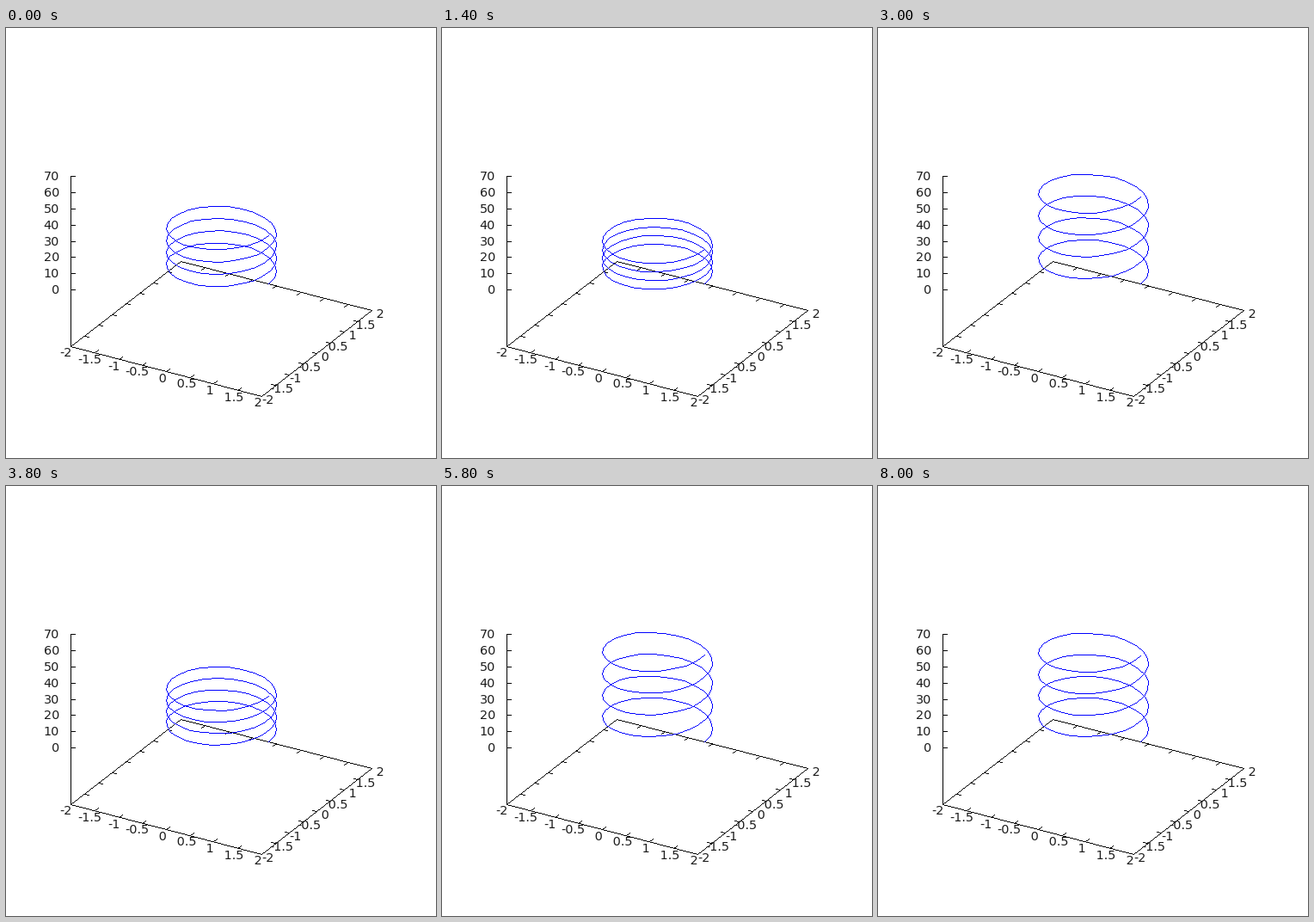
Write a matplotlib script that moves like this. It is 500 px wide and 500 px high and loops after 8200 ms.

```python
import numpy as np
import matplotlib.pyplot as plt
from matplotlib.animation import FuncAnimation

SIZE, DPI = 500, 100
FRAMES, INTERVAL = 41, 200
BLACK, BLUE = (0, 0, 0), (0, 0, 255)

CX, CY = 250.0, 349.2      # centre of the base plane
RX, RY = 64.0, 28.75       # screen radii of a unit circle
Z_UNIT, Z_BASE = 1.888, -35
VIEW = np.radians(30)

plt.rcParams["font.family"] = "DejaVu Sans"
fig = plt.figure(figsize=(SIZE / DPI, SIZE / DPI), dpi=DPI, facecolor="white")
ax = fig.add_axes([0, 0, 1, 1])
ax.axis("off")


def project(x, y, z=Z_BASE):
    """Map 3D coordinates to whole screen pixels."""
    c, s = np.cos(VIEW), np.sin(VIEW)
    sx = CX + RX * (x * c + y * s)
    sy = CY + RY * (x * s - y * c) - Z_UNIT * (z - Z_BASE)
    return np.round(sx), np.round(sy)


def stroke(canvas, xs, ys, color=BLACK):
    """Draw a crisp polyline exactly one pixel wide."""
    for x0, y0, x1, y1 in zip(xs, ys, xs[1:], ys[1:]):
        n = int(max(abs(x1 - x0), abs(y1 - y0))) + 1
        cols = np.floor(np.linspace(x0, x1, n) + 0.5).astype(int)
        rows = np.floor(np.linspace(y0, y1, n) + 0.5).astype(int)
        canvas[rows, cols] = color


def tick(canvas, start, dx, dy):
    x, y = start
    stroke(canvas, [x, x + dx], [y, y + dy])


def label(x, y, text, ha="left"):
    ax.text(x, y, text, ha=ha, va="baseline",
            fontsize=14.4 * 72 / DPI, color="#1c1c1c")


def draw_box(canvas):
    stroke(canvas, *project(np.array([-2, 2, 2, -2, -2]),
                            np.array([-2, -2, 2, 2, -2])))
    left, bottom = project(-2, -2)
    stroke(canvas, [left, left], [bottom, project(-2, -2, 70)[1]])

    for v in np.arange(-2, 2.5, 0.5):
        front, back = project(v, -2), project(v, 2)
        near, far = project(2, v), project(-2, v)
        if abs(v) < 2:
            tick(canvas, front, 4, -3)
            tick(canvas, back, -4, 3)
            tick(canvas, near, -5, -1)
            tick(canvas, far, 5, 1)
        text = f"{v: g}"
        half = 3.5 * len(text)
        label(front[0] - 6.5 - half, front[1] + 12, text)
        label(near[0] + 7 - half, near[1] + 8.5, text)

    for z in range(0, 71, 10):
        x, y = project(-2, -2, z)
        tick(canvas, (x, y), 5, 0)
        label(61.5, y + 4.5, str(z), "right")


box = np.full((SIZE, SIZE, 3), 255, dtype=np.uint8)
draw_box(box)
picture = ax.imshow(box, interpolation="nearest")
t = np.linspace(0, 8 * np.pi, 100)


def update(i):
    stretch = 1.2 + np.sin(0.5 * i)
    canvas = box.copy()
    stroke(canvas, *project(np.cos(t), np.sin(t), stretch * t), BLUE)
    picture.set_data(canvas)
    return picture,


anim = FuncAnimation(fig, update, frames=FRAMES, interval=INTERVAL,
                     repeat=True, repeat_delay=0)
plt.show()
```
